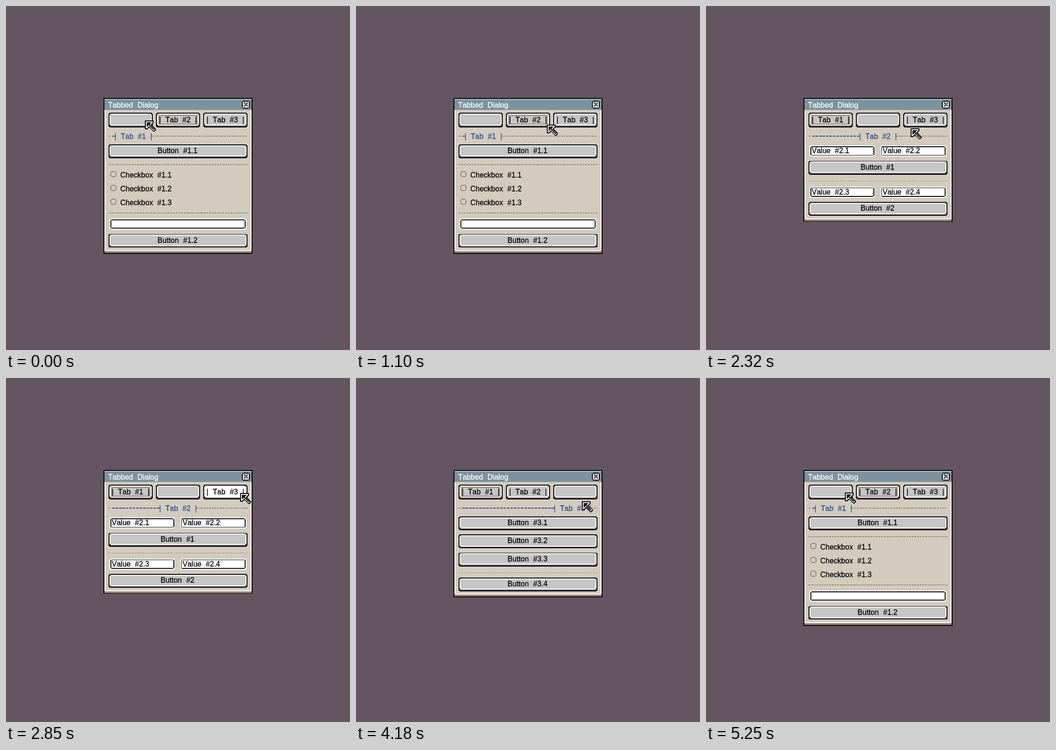
Animation of 748 by 748 pixels, one loop 6.21 s. Source, as an HTML page:

```html
<!DOCTYPE html>
<html lang="en">
<head>
<meta charset="utf-8">
<title>Tabbed Dialog</title>
<style>
  html, body { margin: 0; width: 100%; height: 100%; overflow: hidden; background: #655561; }
  svg { display: block; width: 748px; height: 748px; }
  rect, path { shape-rendering: crispEdges; }
  text {
    font: 16px "Liberation Sans", Arial, sans-serif;
    font-kerning: none;
    white-space: pre;
    word-spacing: 5px;
    stroke-width: .3px;
  }
</style>
</head>
<body>
<svg viewBox="0 0 748 748">
  <g id="dialog"></g>
  <g id="cursor">
    <g transform="scale(1.87)">
      <path d="M0 0H10V3L8 5L13 10V11L11 13H10L5 8L3 10H0Z"/>
      <path fill="#fff" d="M1 1H9V2.5L6.6 5L12 10.4L10.4 12L5 6.6L2.5 9H1Z"/>
      <path d="M2 2H8L5.5 4.5L11 10L10 11L4.5 5.5L2 8Z"/>
    </g>
  </g>
</svg>
<script>
const UNIT = 1.87, LOOP = 6210;
const INK = '#000', FACE = '#c6c6c6', BODY = '#d3cbbe', BROWN = '#968275',
      SHADE = '#655561', BLUE = '#2c4c91', TITLE = '#7d929e', WHITE = '#fff';
const LEFT = 119.5, RIGHT = 280.5;
const TAB_X = [119.5, 174.5, 229.5], TAB_W = 51;
const BOTTOM = [288, 251, 255];

const dialog = document.getElementById('dialog');
const cursor = document.getElementById('cursor');
const px = v => Math.round(v * UNIT);

// Boxes use interface units, text uses stage pixels.
function box(x, y, w, h, fill) {
  const l = px(x), t = px(y);
  return `<rect x="${l}" y="${t}" width="${px(x + w) - l}" height="${px(y + h) - t}" fill="${fill}"/>`;
}

// Box with its corner units left out.
const chip = (x, y, w, h, fill) =>
  box(x + 1, y, w - 2, h, fill) + box(x, y + 1, w, h - 2, fill);

const frame = (x, y, w, h, line, fill) =>
  chip(x, y, w, h, line) + box(x + 1, y + 1, w - 2, h - 2, fill);

const label = (s, x, y, color = INK, anchor = 'start') =>
  `<text x="${x}" y="${y}" fill="${color}" stroke="${color}" text-anchor="${anchor}">${s}</text>`;

function dashes(from, to, y, color, on = 2, off = 1) {
  let out = '';
  for (let x = from; x < to; x += on + off) out += box(x, y, Math.min(on, to - x), 1, color);
  return out;
}

const separator = y => dashes(LEFT, RIGHT, y, BROWN);

const plate = (x, y, w, h, face = FACE) =>
  chip(x, y, w, h, INK) + box(x + 2, y + h - 2, w - 4, 1, SHADE) +
  chip(x + 1, y + 1, w - 2, h - 3, WHITE) + box(x + 2, y + 2, w - 4, h - 5, face);

const button = (s, y) =>
  plate(LEFT, y, RIGHT - LEFT, 16) + label(s, 373, px(y) + 19, INK, 'middle');

const field = (x, y, w, s = '') =>
  chip(x - 1, y - 1, w + 2, 13, WHITE) + frame(x, y, w, 11, INK, WHITE) +
  label(s, px(x) + 3, px(y) + 15);

const checkbox = (s, y) =>
  frame(121.5, y, 7, 7, BROWN, BODY) + label(s, 248.5, px(y) + 14);

function tabButton(i, { tab, hot, down }) {
  const x = TAB_X[i], pressed = down === i;
  const face = pressed ? TITLE : hot === i ? WHITE : FACE;
  let out = plate(x, 124, TAB_W, 17, face);
  if (i === tab) return out;
  if (i === (tab === 0 ? 1 : 0)) {
    out += box(x + 3, 127, TAB_W - 6, 11, BROWN) + box(x + 4, 128, TAB_W - 8, 9, face);
  }
  return out + label(`| Tab #${i + 1} |`, px(x + TAB_W / 2), 253, pressed ? WHITE : INK, 'middle');
}

function heading(tab) {
  const end = 127.5 + tab * 52;
  return dashes(LEFT, 122.5, 151, BROWN) +
    dashes(123.5, end, 151, BLUE, 3, 1) +
    label(`| Tab #${tab + 1} |`, px(end + 20.5), 289, BLUE, 'middle') +
    dashes(end + 42, RIGHT, 151, BROWN);
}

function windowFrame(bottom) {
  const cross = [0, 1, 2, 3, 4].map(i =>
    box(276.5 + i, 112 + i, 1, 1, INK) + box(280.5 - i, 112 + i, 1, 1, INK)).join('');
  return box(113.5, 107, 173, bottom - 107, INK) +
    box(114.5, 108, 171, 13, TITLE) + box(114.5, 108, 171, 1, '#a9c4d0') +
    box(114.5, 121, 171, bottom - 122, WHITE) +
    box(115.5, 121, 169, bottom - 125, BODY) +
    box(114.5, bottom - 3, 171, 2, BROWN) +
    label('Tabbed Dialog', 222, 221, WHITE) +
    chip(274.5, 110, 9, 9, INK) + box(275.5, 111, 7, 7, WHITE) +
    box(276.5, 112, 5, 5, FACE) + cross;
}

const fieldPair = (y, a, b) => field(121.5, y, 74, a) + field(203.5, y, 75, b);

const pages = [
  () => button('Button #1.1', 161) + separator(184) +
    [1, 2, 3].map(n => checkbox(`Checkbox #1.${n}`, 176 + n * 16)).join('') +
    separator(240) + field(121.5, 248, 157) + button('Button #1.2', 265),
  () => fieldPair(163, 'Value #2.1', 'Value #2.2') +
    button('Button #1', 180) + separator(203) +
    fieldPair(211, 'Value #2.3', 'Value #2.4') +
    button('Button #2', 228),
  () => [1, 2, 3].map(n => button(`Button #3.${n}`, 140 + n * 21)).join('') +
    separator(226) + button('Button #3.4', 232)
];

// Dialog state from each time on.
const states = [
  { at: 0, tab: 0 },
  { at: 1680, tab: 0, down: 1 },
  { at: 1800, tab: 1 },
  { at: 2400, tab: 1, hot: 2 },
  { at: 3380, tab: 1, down: 2 },
  { at: 3470, tab: 2 },
  { at: 4750, tab: 2, hot: 0 },
  { at: 5100, tab: 2, down: 0 },
  { at: 5250, tab: 0 }
];

// Pointer moves: first step, last step, step count, evenly timed points.
const moves = [
  [650, 1220, 14, [[302, 249], [326, 270], [378, 275], [417, 259], [405, 249]]],
  [1340, 1340, 1, [[405, 249], [404, 248]]],
  [1920, 2260, 8, [[404, 248], [411, 262], [432, 267]]],
  [2320, 2540, 6, [[432, 267], [472, 264], [508, 252]]],
  [2730, 2850, 2, [[508, 252], [509, 250]]],
  [4090, 4690, 12, [[509, 250], [482, 277], [418, 286], [345, 279], [314, 263]]],
  [4750, 5100, 7, [[314, 263], [306, 254], [302, 249]]]
];

function along(points, u) {
  const f = u * (points.length - 1);
  const i = Math.min(Math.floor(f), points.length - 2);
  return points[i].map((v, k) => Math.round(v + (points[i + 1][k] - v) * (f - i)));
}

function pointer(t) {
  let move = null;
  for (const m of moves) if (t >= m[0]) move = m;
  if (!move) return moves[0][3][0];
  const [from, to, steps, points] = move;
  const done = t >= to ? steps : 1 + Math.floor((t - from) / (to - from) * (steps - 1));
  return along(points, done / steps);
}

let shown = null;
function draw(t) {
  let state = states[0];
  for (const s of states) if (t >= s.at) state = s;
  if (state !== shown) {
    shown = state;
    dialog.innerHTML = windowFrame(BOTTOM[state.tab]) +
      TAB_X.map((_, i) => tabButton(i, state)).join('') +
      heading(state.tab) + pages[state.tab]();
  }
  cursor.setAttribute('transform', `translate(${pointer(t)})`);
}

const start = performance.now();
function tick() {
  draw((performance.now() - start) % LOOP);
  requestAnimationFrame(tick);
}
tick();
</script>
</body>
</html>
```
